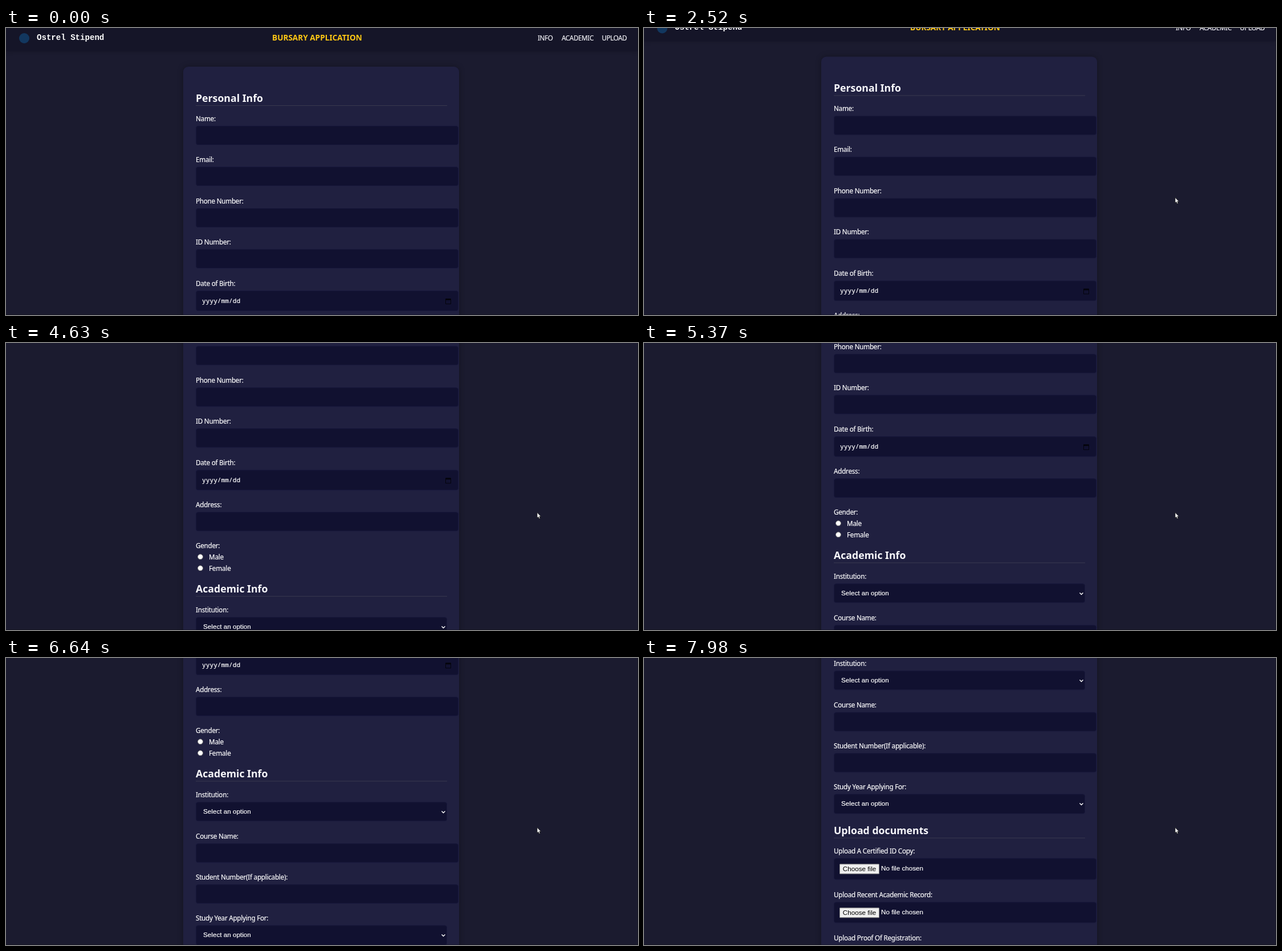
Animation of 1109x505 px, one loop 8000 ms. Source, as an HTML page:

```html
<!DOCTYPE html>
<html lang="en">
<head>
<meta charset="utf-8">
<title>Bursary application</title>
<style>
  html, body { margin: 0; width: 100%; height: 100%; overflow: hidden; background: #1b1b2f; }
  body { position: relative; color: #fff; font: 11.7px/16px "Noto Sans", sans-serif; }
  #page, #page *, #pointer { position: absolute; box-sizing: border-box; white-space: pre; }
  #page { left: 0; top: 0; width: 1109px; height: 1300px; }

  header { left: 0; top: 0; width: 1109px; height: 41px; background: #151528; box-shadow: 0 2px 7px rgba(0, 0, 0, .15); }
  .logo { left: 23px; top: 9px; width: 18px; height: 18px; border-radius: 50%; background: #12375f; }
  .brand { left: 54px; top: 8.5px; font: bold 14.08px/16px "Liberation Mono", monospace; }
  .title { left: 467px; top: 9px; font-size: 13.6px; font-weight: bold; color: #ffc814; }
  nav { left: 0; top: 9px; font-size: 11.7px; letter-spacing: -.4px; color: #f0f0f5; }

  #card { left: 311px; top: 68px; width: 484px; height: 1300px; border-radius: 9px; background: #202040; box-shadow: 0 0 11px rgba(0, 0, 0, .3); }
  h2 { left: 333px; width: 441px; height: 26.5px; margin: 0; border-bottom: 1px solid #39394f; font-size: 17.7px; line-height: 24px; color: #f8f8fc; }
  .label { left: 333px; letter-spacing: -.26px; }
  .label, .option, nav, .field span { -webkit-text-stroke: .2px; }
  .field { left: 333px; width: 461px; height: 34px; border: 1px solid #17173a; border-radius: 4px; background: #111130; }
  .select { width: 441px; height: 34.5px; font: 11.7px/32px "Liberation Sans", sans-serif; }
  .select span { left: 12px; }
  .select svg { left: 429px; top: 14px; width: 9px; height: 6px; fill: none; stroke: #fff; stroke-width: 1.4; }
  .date { height: 36px; }
  .date span { left: 10px; top: 9px; font: 11.2px/16px "Noto Sans Mono", monospace; }
  .date i { left: 437px; top: 13px; width: 10px; height: 10px; border: 1px solid #04040c; border-top-width: 3px; border-radius: 1px; }
  .file { height: 37.5px; font: 11.7px/16px "Liberation Sans", sans-serif; }
  .file b { left: 9px; top: 9px; width: 70px; height: 18px; border: 1px solid #858585; border-radius: 1px; background: #efefef; color: #000; font-weight: normal; text-align: center; }
  .file span { left: 82px; top: 9px; }
  .radio { left: 336px; width: 10px; height: 10px; border: 1px solid #767676; border-radius: 50%; background: #fff; }
  .option { left: 356px; letter-spacing: -.2px; }

  #pointer { left: 0; top: 0; width: 9px; height: 13px; }
  #edge { position: absolute; left: 0; top: 0; width: 1109px; height: 505px; box-shadow: inset -1px -1px rgba(0, 0, 0, .3); }
</style>
</head>
<body>
<div id="page">
  <div id="card"></div>
  <header>
    <div class="logo"></div>
    <div class="brand">Ostrel Stipend</div>
    <div class="title">BURSARY APPLICATION</div>
    <nav><span style="left:933px">INFO</span><span style="left:975px">ACADEMIC</span><span style="left:1045.5px">UPLOAD</span></nav>
  </header>
</div>
<svg id="pointer" viewBox="0 0 9 13"><path d="M.7 .7V10.2L2.8 8.3L4.2 11.7L6 10.9L4.6 7.7H7.4Z" fill="#fff" stroke="#111" stroke-width=".8"/></svg>
<div id="edge"></div>
<script>
const page = document.getElementById('page');
const pointer = document.getElementById('pointer');

function add(tag, cls, y, html = '') {
  const el = document.createElement(tag);
  el.className = cls;
  el.style.top = y + 'px';
  el.innerHTML = html;
  page.append(el);
}

// Each helper takes the vertical centre of the text it sets.
const heading = (text, y) => add('h2', '', y - 12.6, text);
const label = (text, y) => add('div', 'label', y - 8.5, text);
const radio = (text, y) => { add('div', 'radio', y - 5.5); add('div', 'option', y - 8.5, text); };

const content = {
  '': '',
  select: '<span>Select an option</span><svg viewBox="0 0 9 6"><path d="M1.5 1.3L4.5 4.3L7.5 1.3"/></svg>',
  date: '<span>yyyy/mm/dd</span><i></i>',
  file: '<b>Choose file</b><span>No file chosen</span>'
};
function field(text, y, kind = '') {
  label(text, y);
  add('div', 'field ' + kind, y + 12.5, content[kind]);
}

heading('Personal Info', 123.5);
field('Name:', 159.5);
field('Email:', 231.8);
field('Phone Number:', 304.3);
field('ID Number:', 376.8);
field('Date of Birth:', 449, 'date');
field('Address:', 523.2);
label('Gender:', 595.5);
radio('Male', 615.3);
radio('Female', 635.3);
heading('Academic Info', 671.5);
field('Institution:', 708.2, 'select');
field('Course Name:', 781);
field('Student Number(If applicable):', 853.3);
field('Study Year Applying For:', 925.7, 'select');
heading('Upload documents', 1002.5);
field('Upload A Certified ID Copy:', 1038.7, 'file');
field('Upload Recent Academic Record:', 1115.3, 'file');
field('Upload Proof Of Registration:', 1191.3, 'file');

const LOOP = 8000, NOTCH = 73.33, GLIDE = 160;

// Wheel notches: the start of the glide, then the times at which the screen refreshes.
const notches = [
  [2469, 2520, 2590, 2660],
  [3217, 3270, 3340, 3410],
  [3806, 3820, 3870, 3940, 4010],
  [4577, 4630, 4700, 4770],
  [5346, 5370, 5440, 5510, 5580],
  [5892, 5910, 5960, 6040, 6110],
  [6573, 6640, 6710, 6780],
  [7020, 7040, 7110, 7180, 7250],
  [7359, 7400, 7450, 7520],
  [7897, 7920, 7980]
];
const sweep = [320, 390, 460, 520, 590, 660, 720, 790];
const lift = [990, 1060, 1130];

const passed = (times, t) => times.filter(s => s <= t).length;
const smooth = p => p * p * (3 - 2 * p);

function scrollAt(t) {
  return notches.reduce((sum, [start, ...steps]) => {
    const n = passed(steps, t);
    return n ? sum + NOTCH * smooth(Math.min(1, (steps[n - 1] - start) / GLIDE)) : sum;
  }, 0);
}

function pointerAt(t) {
  const u = Math.max(0, passed(sweep, t) - 1) / (sweep.length - 1);
  const bend = (a, b, c) => (1 - u) ** 2 * a + 2 * u * (1 - u) * b + u * u * c;
  const up = smooth(passed(lift, t) / lift.length);
  return [bend(1057, 925, 931.3), bend(492, 480, 334.6) - 37 * up];
}

function draw(now) {
  const t = now % LOOP;
  const [x, y] = pointerAt(t);
  page.style.transform = `translateY(${-scrollAt(t).toFixed(2)}px)`;
  pointer.style.transform = `translate(${x}px, ${y}px)`;
  pointer.style.visibility = t < sweep[0] ? 'hidden' : 'visible';
}

const began = performance.now();
function tick() {
  draw(performance.now() - began);
  requestAnimationFrame(tick);
}
tick();
</script>
</body>
</html>
```
